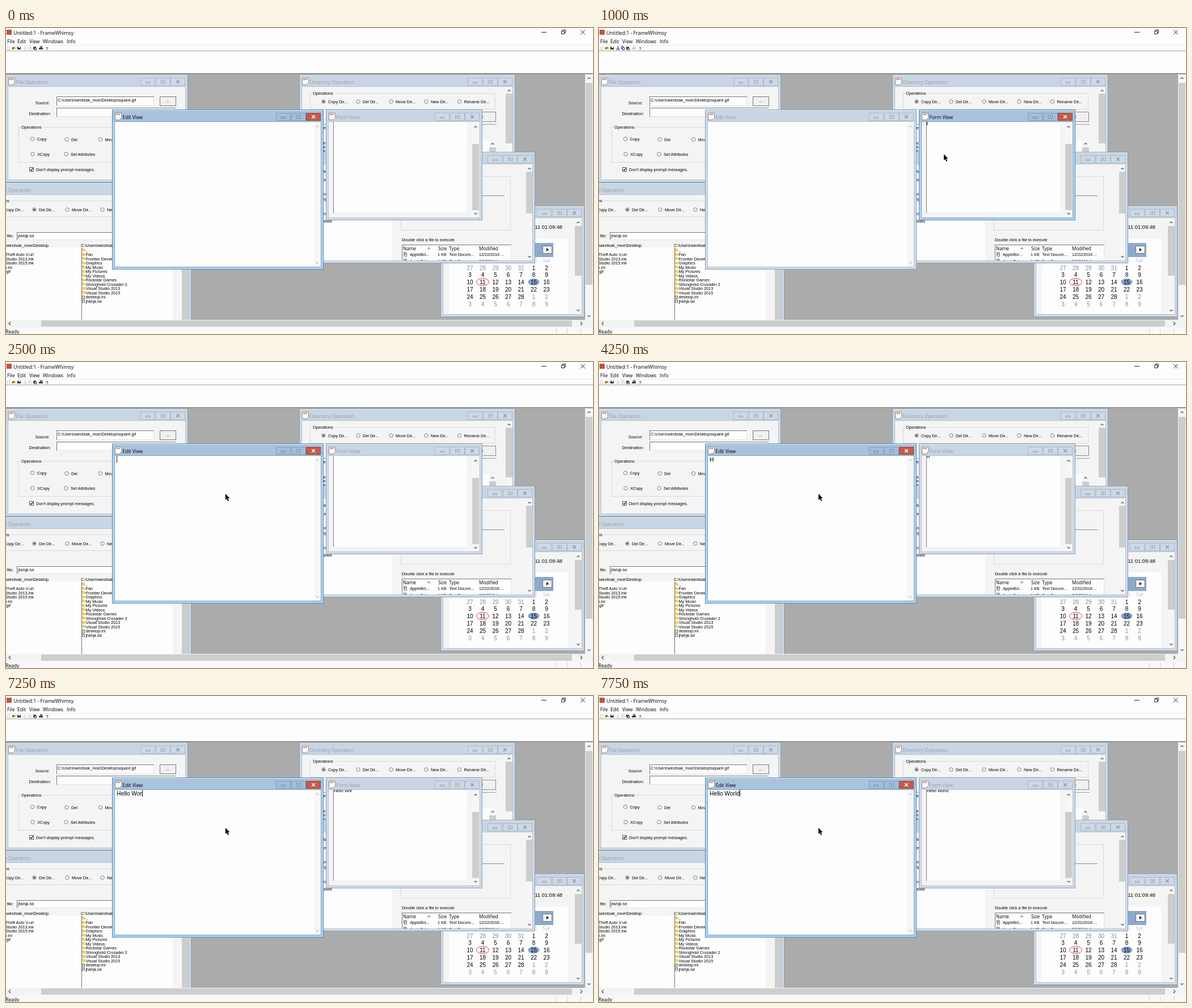
An HTML page for the animation above (8 s loop, 1035 by 541 pixels).

```html
<!DOCTYPE html>
<html lang="en">
<head>
<meta charset="utf-8">
<title>Edit and form views</title>
<style>
  html, body { margin: 0; width: 100%; height: 100%; overflow: hidden; background: #fdfdfd; }
  svg { display: block; }
  text { font-family: "Liberation Sans", Arial, sans-serif; white-space: pre; }
  .ui { font-family: "Open Sans", sans-serif; }
  .end { text-anchor: end; }
  .mid { text-anchor: middle; }
  .bold { font-weight: bold; }
  rect { shape-rendering: crispEdges; }
</style>
</head>
<body>
<svg id="stage" width="1035" height="541"><g id="back"></g><g id="front"></g></svg>
<script>
const PANEL = '#f4f4f4', WHITE = '#fdfdfd', EDGE = '#d9d9d9', DIM = '#959da6', USER = 'wirotsak_moe';

// Boxes are given by left, top, right and bottom.
const box = (x, y, r, b, fill, stroke) => stroke
  ? `<rect x="${x + .5}" y="${y + .5}" width="${r - x - 1}" height="${b - y - 1}" fill="${fill}" stroke="${stroke}"/>`
  : `<rect x="${x}" y="${y}" width="${r - x}" height="${b - y}" fill="${fill}"/>`;
const text = (x, y, s, size = 7.3, fill = '#000', cls = '') =>
  `<text x="${x}" y="${y}" font-size="${size}" fill="${fill}" class="${cls}">${s}</text>`;
const path = (d, stroke, width = 1, fill = 'none') =>
  `<path d="${d}" fill="${fill}" stroke="${stroke}" stroke-width="${width}"/>`;
const clip = (x, y, r, b, body) =>
  `<svg x="${x}" y="${y}" width="${r - x}" height="${b - y}" viewBox="${x} ${y} ${r - x} ${b - y}">${body}</svg>`;
const ellipse = (x, y, rx, ry, fill, stroke) =>
  `<ellipse cx="${x}" cy="${y}" rx="${rx}" ry="${ry}" fill="${fill}" stroke="${stroke}"/>`;
const cross = (x, y, n, color, width) =>
  path(`M${x - n} ${y - n}l${2 * n} ${2 * n}m0 ${-2 * n}l${-2 * n} ${2 * n}`, color, width);

const field = (x, y, r, b) => box(x, y, r, b, WHITE, '#e3e3e3') + box(x, y, r, y + 1, '#777') + box(x, y, x + 1, b, '#777');
const radio = (x, y, label, on) => ellipse(x, y, 3.2, 3.2, '#fff', '#777') +
  (on ? ellipse(x, y, 1.6, 1.6, '#111', 'none') : '') + text(x + 8, y + 3, label);
const folder = (x, y) => box(x, y, x + 3, y + 2, '#d8b13c') + box(x, y + 1, x + 6, y + 5, '#f0cf62');
const page = (x, y) => box(x, y, x + 5, y + 6, '#fff', '#777') + box(x + 2, y + 2, x + 4, y + 3, '#777');

function scrollbar(x, top, bottom, thumbTop, thumbBottom, color = '#555') {
  const c = x + 6;
  return box(x, top, x + 12, bottom, '#f6f6f6') +
    box(x, thumbTop, x + 12, thumbBottom, '#cdcdcd') +
    path(`M${c - 2.5} ${top + 8}l2.5 -2.5l2.5 2.5M${c - 2.5} ${bottom - 8}l2.5 2.5l2.5 -2.5`, color, 1.1);
}

function docIcon(x, y) {
  return path(`M${x + .5} ${y + .5}h11v8l-3 4h-8z`, '#8a8a8a', 1, '#fff') + box(x + 2, y + 2, x + 9, y + 4, '#e08a80');
}

function button(cx, cy, kind, active) {
  const red = active && kind === 'close';
  const fill = red ? '#c75a49' : active ? '#a3bedb' : '#cdd9e6';
  const mark = active ? '#5c7897' : '#8d99a6';
  const marks = {
    min: box(cx - 4, cy, cx + 4, cy + 3, '#fff', mark),
    max: box(cx - 4, cy - 3, cx + 4, cy + 3, '#fff', mark) + box(cx - 2, cy - 1, cx + 2, cy + 1, mark),
    close: cross(cx, cy, 2.8, active ? '#fff' : mark, 1.6)
  };
  return box(cx - 13, cy - 7, cx + 13, cy + 7, fill, red ? '#94483f' : active ? '#7f9cbb' : '#abb9c7') + marks[kind];
}

function win(x, y, r, b, title, body, active = false) {
  const frame = active ? '#b4d2ee' : '#d0dce9', caption = active ? '#a9c2dd' : '#c8d5e3';
  return clip(x, y, r, b,
    box(x, y, r, b, frame, active ? '#4a8fc4' : '#8c9db0') +
    box(x + 1, y + 1, r - 1, y + 21, caption) +
    box(x + 1, y + 1, r - 1, y + 2, '#e4ecf4') +
    docIcon(x + 5, y + 6) +
    text(x + 18.5, y + 16.5, title, 8.5, active ? '#000' : DIM, 'ui') +
    button(r - 71, y + 13, 'min', active) + button(r - 44, y + 13, 'max', active) + button(r - 18, y + 13, 'close', active) +
    box(x + 4, y + 21, r - 4, b - 4, PANEL, active ? '#7fa0c0' : '#b3c1cf') +
    clip(x + 5, y + 22, r - 5, b - 5, body));
}

function shell() {
  const menu = [[2, 'File'], [20, 'Edit'], [41, 'View'], [65, 'Windows'], [107, 'Info']];
  return box(0, 0, 1035, 541, WHITE) +
    box(1, 3, 10, 12, '#c4513c') +
    text(13, 11.5, 'Untitled:1 - FrameWhimsy', 8.8, '#000', 'ui') +
    path('M944 7.5h9M979.5 5.5h5v5h-5zM981.5 5.5v-2h5v5h-2', '#222') + cross(1017, 7.5, 3.8, '#222', 1) +
    menu.map(([x, s]) => text(x, 27, s, 8.5, '#000', 'ui')).join('') +
    box(0, 30, 1035, 31, '#ececec') + box(0, 40, 1035, 41, '#a0a0a0') +
    box(0, 80, 1035, 516, '#ababab') + box(0, 80, 1035, 81, '#6f6f6f') +
    scrollbar(1022, 82, 516, 97, 454) + box(1021, 81, 1022, 516, '#eee') + box(1034, 81, 1035, 516, '#f6f6f6') +
    box(0, 516, 1035, 529, '#f3f3f3') + box(62, 517, 998, 528, '#cdcdcd') +
    path('M8 519.5l-3 3l3 3M1013 519.5l3 3l-3 3', '#444', 1.1) +
    box(0, 529, 1035, 541, '#f8f8f8') + text(-1, 540, 'Ready', 8.5, '#000', 'ui') +
    [970, 989, 1013].map(x => box(x, 531, x + 1, 541, '#d5d5d5')).join('');
}

function fileWindow() {
  return win(-1, 82, 321, 273, 'File Operation',
    text(77, 135, 'Source:', 7.3, '#000', 'end') + field(89, 121, 261, 138) +
    text(91, 129.5, `C:\\Users\\${USER}\\Desktop\\square.gif`) +
    box(271, 121, 300, 138, '#f0f0f0', '#777') + text(285, 131, '...', 7.3, '#000', 'mid') +
    text(79, 154, 'Destination:', 7.3, '#000', 'end') + field(89, 141, 299, 157) +
    box(22, 175, 299, 238, 'none', EDGE) + box(25, 172, 64, 180, PANEL) + text(27, 178, 'Operations') +
    radio(46.5, 196, 'Copy') + radio(107, 197, 'Del') + radio(166.5, 197, 'Move') +
    radio(47, 223, 'XCopy') + radio(106, 223, 'Set Attributes') +
    box(41, 246, 49, 254, '#fff', '#555') + path('M43 250l1.6 1.8l3 -4', '#111', 1.3) +
    text(53, 253, 'Don\'t display prompt messages.'));
}

function leftDirectoryWindow() {
  const files = ['Grand Theft Auto V.url', 'Visual Studio 2013.lnk', 'Visual Studio 2015.lnk', 'desktop.ini', 'square.gif'];
  const ends = [49, 49, 49, 11, 8];
  const entries = ['..', 'Fan', 'Frontier Developments', 'Graphics', 'My Music', 'My Pictures', 'My Videos', 'Rockstar Games',
    'Stronghold Crusader 2', 'Visual Studio 2013', 'Visual Studio 2015', 'desktop.ini', 'jhkhjk.txt'];
  return clip(0, 272, 327, 516, win(-53, 273, 327, 540, '',
    box(-20, 305, 300, 334, 'none', EDGE) + box(-20, 300, 8, 309, PANEL) + text(6, 308, 'Operations', 7.3, '#000', 'end') +
    text(31, 324, 'Copy Dir...', 7.3, '#000', 'end') +
    radio(50, 321, 'Del Dir...', true) + radio(108, 321, 'Move Dir...') + radio(170, 321, 'New Dir...') +
    text(13, 370, 'file:', 7.3, '#000', 'end') + field(19, 361, 300, 375) + text(21, 369.5, 'jhkhjk.txt') +
    box(-20, 388, 130, 540, WHITE) + box(133, 388, 294, 540, WHITE) + box(133, 388, 134, 540, '#777') +
    text(75, 387, `C:\\Users\\${USER}\\Desktop`, 7.3, '#000', 'end') + text(132, 387, `C:\\Users\\${USER}`) +
    files.map((s, i) => text(ends[i], 403 + i * 7.5, s, 7.3, '#000', 'end')).join('') +
    entries.map((s, i) => (i < 11 ? folder : page)(134, 390 + Math.round(i * 7.5)) + text(140.5, 395.5 + i * 7.5, s)).join('') +
    scrollbar(310, 295, 540, 310, 530)) + text(44, 289.5, 'Directory Operation', 8.5, DIM, 'ui end'));
}

function directoryWindow() {
  const labels = ['Copy', 'Del', 'Move', 'New', 'Rename'], spots = [560, 621, 679, 741, 799.5];
  return win(517, 82, 898, 360, 'Directory Operation',
    box(536, 115, 863, 144, 'none', EDGE) + box(539, 111, 579, 120, PANEL) + text(541, 118, 'Operations') +
    labels.map((s, i) => radio(spots[i], 130, s + ' Dir...', !i)).join('') +
    box(800, 148, 864, 166, '#f0f0f0', '#888') + text(841.5, 159, 'Back', 7.3, '#000', 'end') +
    box(560, 170, 865, 171, '#999') +
    box(540, 198, 852, 340, WHITE) + scrollbar(852, 198, 340, 211, 260) +
    [179, 206, 213, 220].map(y => text(566, y, 'folder', 7.3, '#000', 'end')).join('') +
    scrollbar(881, 104, 340, 116, 204));
}

function calendarWindow() {
  let days = '';
  for (let i = 0; i < 42; i++) {
    const n = i < 5 ? 27 + i : i < 33 ? i - 4 : i - 32;
    const x = 818 + (i % 7) * 22.5, y = 427.5 + Math.floor(i / 7) * 12.8;
    if (n === 15) days += ellipse(x, y - 4, 10, 6.2, '#83a2c7', 'none');
    if (n === 11) days += ellipse(x, y - 4, 11, 6.5, 'none', '#e8383d');
    days += text(x, y, n, 10, i < 5 || i > 32 ? '#8d8d8d' : '#000', 'mid');
  }
  return win(766, 314, 1020, 511, '',
    text(981, 355, '12/11 01:09:48', 9.3, '#000', 'end') +
    box(781, 372, 991, 506, WHITE) +
    box(800, 380, 965, 405, '#8caacd') + box(946, 385, 963, 399, '#f4f4f4', '#777') +
    path('M953 389l4 3l-4 3z', 'none', 0, '#111') +
    text(931, 414, 'Fri', 9, '#b4c0cf', 'ui mid') + text(953, 414, 'Sat', 9, '#b4c0cf', 'ui mid') + days +
    scrollbar(1003, 337, 506, 350, 438));
}

function executeWindow() {
  const heads = [[700, 'Name'], [762, 'Size'], [781, 'Type'], [834, 'Modified']];
  const row = (y, cells) => page(701, y - 7) + page(702, y - 5) +
    cells.map((s, i) => text([712, 761, 781.5, 834][i], y, s, 7.2)).join('');
  return win(500, 219, 933, 416, '',
    box(500, 262, 681, 416, WHITE) +
    ['Data', 'Intel', 'Program', 'Temp', 'Users'].map((s, i) => text(566, [256, 271, 296, 305, 331][i], s, 7.3, '#000', 'end')).join('') +
    text(575, 343.5, 'Windows', 7.3, '#000', 'end') +
    box(696, 262, 890, 358, 'none', EDGE) + box(720, 296, 879, 297, '#888') +
    text(698, 377, 'Double click a file to execute') +
    field(698, 383, 891, 416) +
    heads.map(([x, s]) => text(x, 392.5, s, 8.2, '#000', 'ui')).join('') +
    path('M742 391l3.5 -4l3.5 4z', 'none', 0, '#aaa') +
    row(403, ['AppleBcl...', '1 KB', 'Text Docum...', '12/22/2016 ...']) +
    row(414.5, ['AppleBcl...', '1 KB', 'Text Docum...', '2/8/2016 4:...']) +
    scrollbar(917, 242, 411, 254, 328));
}

function toolbar(formActive) {
  const cut = formActive ? '#223a8c' : '#cfcfcf', print = formActive ? '#cfcfcf' : '#444';
  return box(2, 33, 7, 39, '#fff', '#d0d0d0') +
    box(11, 34, 16, 38, '#6b6420') + path('M12 38l2 -2.5h4l-2 2.5z', 'none', 0, '#e6d247') +
    box(20, 33, 26, 38, '#3d3d1e') + box(22, 33, 25, 35, '#eee') +
    path('M32 32.5l2.5 4M35 32.5l-2.5 4', cut) + ellipse(32, 37.5, 1, 1, 'none', cut) + ellipse(35, 37.5, 1, 1, 'none', cut) +
    box(39, 32, 43, 37, '#fff', cut) + box(41, 34, 45, 39, '#fff', cut) +
    box(48, 33, 53, 38, '#6c6a35', '#444') + box(50, 35, 54, 39, '#fff', '#333') +
    box(58, 35, 65, 38, print) + box(60, 32, 64, 35, '#fff', print) +
    text(70, 38.5, '?', 8, '#4d4700', 'bold');
}

const EDIT_FONT = 10.3, FORM_FONT = 7.4, MESSAGE = 'Hello World';
// Quarter-second step at which each letter of the message appears.
const typedAt = [15, 18, 20, 20, 21, 22, 25, 28, 29, 30, 31];
const pen = document.createElement('canvas').getContext('2d');
pen.font = '103px "Liberation Sans", Arial, sans-serif';

const within = (n, from, to) => n >= from && n < to;

// The pointer hides while the first letter is typed.
function pointer(step) {
  if (step === 0 || within(step, 14, 17)) return '';
  const [x, y] = step < 2 ? [702, 162] : step < 4 ? [650, 196] : step < 5 ? [608, 223] : step < 9 ? [602, 211] : [387, 233];
  return `<g transform="translate(${x} ${y})">` + path('M0 0v11l2.4 -2.2l1.9 4.2l1.8 -.8l-1.9 -4.2h3.3z', 'none', 0, '#000') + '</g>';
}

function views(step) {
  const formActive = within(step, 4, 10);
  const typed = MESSAGE.slice(0, typedAt.filter(s => s <= step).length);
  const caretOn = step > 1 && !within(step, 6, 8) && !within(step, 12, 14) && step !== 17 && step !== 24;
  const caretX = Math.round(195 + pen.measureText(typed).width * EDIT_FONT / 103);

  const form = win(564, 144, 840, 340, 'Form View',
    box(577, 166, 578, 327, '#777') + box(578, 166, 813, 326, WHITE) +
    text(578, 169.5, typed, FORM_FONT) +
    (caretOn && formActive ? box(578, 166, 579, 172, '#111') : '') +
    scrollbar(822, 168, 335, 205, 322), formActive);
  const edit = win(187, 144, 560, 427, 'Edit View',
    box(192, 166, 555, 422, WHITE) + scrollbar(543, 167, 422, 0, 0, '#c4c4c4') +
    text(195, 176, typed, EDIT_FONT) +
    (caretOn && !formActive ? box(caretX, 166, caretX + 1, 178, '#111') : ''), !formActive);

  return toolbar(formActive) + (formActive ? edit + form : form + edit) + pointer(step);
}

const back = document.getElementById('back'), front = document.getElementById('front');
back.innerHTML = shell() + clip(0, 81, 1021, 516, fileWindow() + leftDirectoryWindow() +
  directoryWindow() + calendarWindow() + executeWindow());

let shown = -1;
function draw() {
  const step = Math.floor(performance.now() % 8000 / 250);
  if (step !== shown) front.innerHTML = views(shown = step);
  requestAnimationFrame(draw);
}
draw();
</script>
</body>
</html>
```
